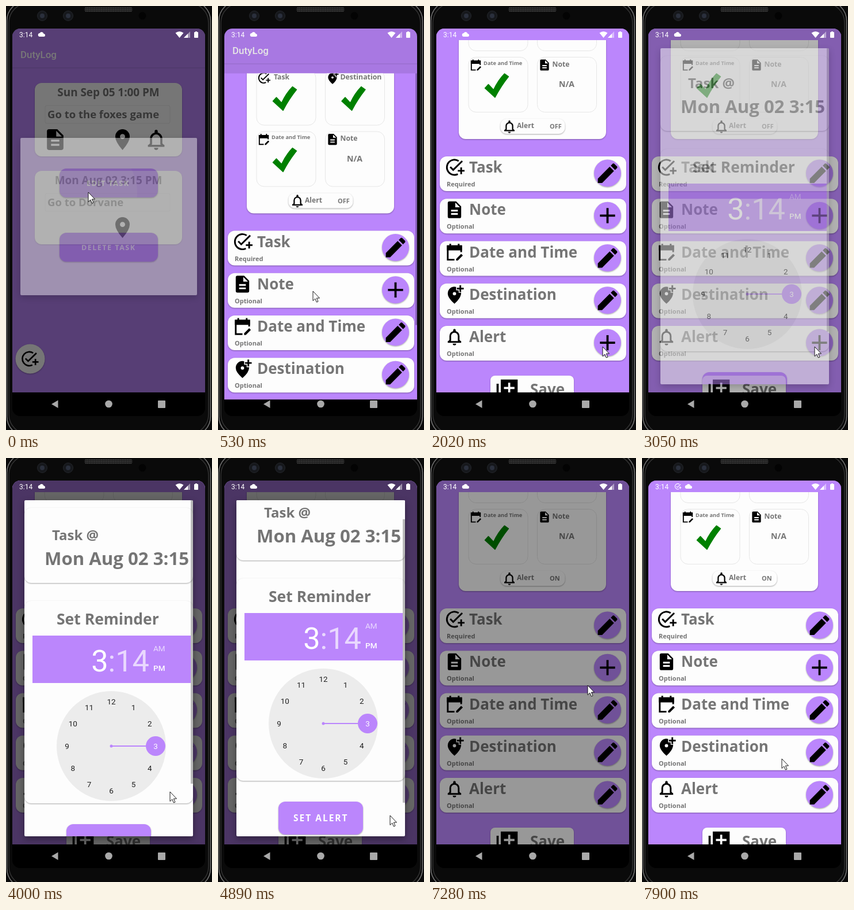
These frames come from a looping animation (358 px wide and 733 px high, 8000 ms). An HTML page:

```html
<!DOCTYPE html>
<html lang="en">
<head>
<meta charset="utf-8">
<title>Task reminder demo</title>
<style>
html, body { margin: 0; height: 100%; overflow: hidden; background: #0a0a0a; }
svg { display: block; width: 100vw; height: 100vh; }
text { font-family: "Open Sans", "Noto Sans", sans-serif; font-weight: 700; }
.ui { font-family: Roboto, sans-serif; font-weight: 400; }
.mid { text-anchor: middle; }
.end { text-anchor: end; }
.bold { font-weight: 500; }
.lift { filter: drop-shadow(0 1px 1px #0005); }
.high { filter: drop-shadow(0 4px 6px #0006); }
</style>
</head>
<body>
<svg id="stage" viewBox="0 0 358 733"></svg>
<script>
const PURPLE = '#bb86fc', PAPER = '#fdfdfd', GREY = '#757575';
const LOOP = 8000, TICKS = 63;

// Each icon: [filled path, stroked path] on a 24 unit grid.
const ICONS = {
  file: ['M14 2H6Q4 2 4 4V20Q4 22 6 22H18Q20 22 20 20V8ZM13 9V3.500L18.500 9ZM8 12V14H16V12ZM8 16V18H16V16Z', ''],
  pin: ['M12 22Q5 14 5 9A7 7 0 0 1 19 9Q19 14 12 22ZM9.500 9a2.500 2.500 0 0 0 5 0a2.500 2.500 0 0 0-5 0Z', ''],
  bell: ['M10 20H14A2 2 0 0 1 10 20ZM10.500 6V4A1.500 1.500 0 0 1 13.500 4V6Z', 'M4 18H20M5 18L7 16V11A5 5 0 0 1 17 11V16L19 18'],
  task: ['', 'M17 4.500A9 9 0 1 0 16 20M7 11.500L10.500 15L21.300 4.500M16 16H24M20 12V20'],
  date: ['M3 4H21V10H3ZM14 22V20L20 14L22 16L16 22Z', 'M12 21H4V5H20V12M7 2V5M17 2V5'],
  place: ['M12 23Q4 16 4 11A8 8 0 0 1 14 3V7H17V10H20Q20 16 12 23ZM10 11a2 2 0 0 0 4 0a2 2 0 0 0-4 0Z', 'M19 1V9M15 5H23'],
  edit: ['M3 17V21H7L18 10L14 6ZM15 5L19 9L21 7V6L18 3H17Z', ''],
  add: ['', 'M5 12H19M12 5V19'],
  save: ['M2 6V22H18V20H4V6ZM6 2V18H22V2ZM13 5H15V9H19V11H15V15H13V11H9V9H13Z', ''],
  cloud: ['M6 20A6 6 0 0 1 5 8A7.500 7.500 0 0 1 19 10A5 5 0 0 1 19 20Z', '']
};

const group = (id, body, more = '') => `<g id="${id}" ${more}>${body}</g>`;
const clipped = (id, body) => `<g clip-path="url(#${id})">${body}</g>`;
const icon = (name, x, y, size, color = '#000') =>
  `<g transform="translate(${x} ${y}) scale(${size / 24})"><path d="${ICONS[name][0]}" fill="${color}" fill-rule="evenodd"/>` +
  `<path d="${ICONS[name][1]}" fill="none" stroke="${color}" stroke-width="2"/></g>`;
const text = (x, y, size, str, fill = GREY, more = '') =>
  `<text x="${x}" y="${y}" font-size="${size}" fill="${fill}" ${more}>${str}</text>`;
const box = (x, y, w, h, r, fill, more = '') =>
  `<rect x="${x}" y="${y}" width="${w}" height="${h}" rx="${r}" fill="${fill}" ${more}/>`;
const dot = (x, y, r, fill, more = '') => `<circle cx="${x}" cy="${y}" r="${r}" fill="${fill}" ${more}/>`;
const card = (x, y, w, h, r = 12) => box(x, y, w, h, r, PAPER, 'class="lift"');
const button = (y, w, h, x, size, gap, str) =>
  box(178.500 - w / 2, y, w, h, 12, PURPLE, 'class="lift"') +
  text(x, y + h / 2 + size * .37, size, str, '#fff', `letter-spacing="${gap}"`);

const lens = x => dot(x, 17, 8.500, '#16181c', 'stroke="#24262b"') + dot(x, 17, 4, '#2a2f3c');
const rim = (inset, color) =>
  box(inset, inset - 10, 357 - 2 * inset, 755 - 2 * inset, 34, 'none', `stroke="${color}" stroke-width="1.500"`);

const phone = () => box(0, 0, 358, 733, 0, '#0a0a0a') + rim(1.500, '#777') + rim(5, '#333') +
  lens(63) + lens(108) + dot(237, 17, 6.500, '#030303') + box(136, 2, 84, 8, 3, '#1c1c1c') +
  '<path d="M138 3H218M138 6H218M138 9H218" stroke="#555" stroke-dasharray="2 1"/>' +
  box(11, 39, 335, 670, 14, '#000') +
  '<path d="M90.500 681.500V695L79 688.200Z" fill="#a9a9a9"/>' + dot(178.500, 688, 6.300, '#a9a9a9') +
  box(264, 682, 13, 13, 1, '#a9a9a9');

const status = () => text(23, 54, 12, '3:14', '#fff', 'class="ui"') +
  group('notice', icon('task', 56, 43, 12.500, '#fff')) + group('cloud', icon('cloud', 56, 43, 12, '#fff')) +
  '<path d="M301.500 55L294.500 46.500Q301.500 41.500 308.500 46.500ZM316 48V55H309Z" fill="#fff"/>' +
  '<path d="M320 44V55H309Z" fill="#fff" opacity=".45"/>' +
  box(327, 45, 7, 10, 1, '#fff') + box(329, 44, 3, 2, 0, '#fff');

const listCard = (y, date, what, icons) => card(50, y, 256, 127) +
  text(178, y + 23, 18.900, date, GREY, 'class="mid"') +
  box(68, y + 39, 217, 31, 3, PAPER, 'stroke="#0001"') + text(72, y + 61, 18.500, what) +
  icons.map((name, i) => name && icon(name, 64 + i * 58.500, y + 76.500, 43)).join('');

const listScreen = () => box(11, 20, 335, 648, 0, PURPLE) + box(11, 106, 335, 2, 0, '#0001') +
  text(25, 90, 17, 'DutyLog', '#fff', 'class="ui bold"') +
  listCard(133, 'Sun Sep 05 1:00 PM', 'Go to the foxes game', ['file', '', 'pin', 'bell']) +
  listCard(285, 'Mon Aug 02 3:15 PM', 'Go to Dorvane', ['', '', 'pin']) +
  dot(42, 610, 25.500, PAPER, 'class="lift"') + icon('task', 24.500, 594, 32);

const popup = () => box(25, 228, 307, 272, 2, '#fff', 'class="high"') +
  button(281, 171, 50, 140, 12.500, 1.500, 'EDIT TASK') +
  clipped('press', dot(143, 322, 85, '#fff', 'fill-opacity=".12"')) +
  button(392, 171, 50, 131, 12.500, 1.500, 'DELETE TASK');

const tick = (x, y) =>
  `<path transform="translate(${x} ${y})" d="M1 26L7 19.500L16 29Q24 12 35 1L42 6Q29 22 18.500 42Z" fill="green" stroke="green" stroke-width="1.500" stroke-linejoin="round"/>`;

const cell = ([name, title, size, indent], i) => {
  const x = 67 + i % 2 * 119.500, y = -17.500 + (i >> 1) * 106;
  return box(x, y, 103, 95, 13, PAPER, 'stroke="#e6e6e6"') + icon(name, x + 1, y + 2, 23) +
    text(x + indent, y + 4 + size, size, title) +
    (title === 'Note' ? text(x + 51, y + 51.500, 14.100, 'N/A', GREY, 'class="mid"') : tick(x + 27.500, y + 27.500));
};

const row = ([name, title, action], i) => {
  const y = 260 + i * 73.250;
  return card(17, y, 324, 60) + icon(name, 25, y + 1.500, 35) + text(68, y + 28, 26, title) +
    text(29, y + 52, 11, i ? 'Optional' : 'Required') + dot(308.500, y + 29, 23.500, PURPLE, 'class="lift"') +
    group('do' + title, icon(action, 286, y + 6.500, 45));
};

const editPage = () => card(50, -32, 256, 262) +
  [['task', 'Task', 12.200, 30], ['place', 'Destination', 12.300, 26],
    ['date', 'Date and Time', 9.300, 26], ['file', 'Note', 12.200, 26]].map(cell).join('') +
  card(122.500, 195, 112, 26, 11) + icon('bell', 124.500, 195, 27) + text(151, 211, 12.100, 'Alert') +
  text(208, 212, 11, 'OFF', GREY, 'id="state"') +
  [['task', 'Task', 'edit'], ['file', 'Note', 'add'], ['date', 'Date and Time', 'edit'],
    ['place', 'Destination', 'edit'], ['bell', 'Alert', 'add']].map(row).join('') +
  group('alertSet', icon('edit', 286, 559.500, 45)) +
  card(105, 639, 145, 60, 8) + icon('save', 112, 642, 44) + text(174, 671.500, 26, 'Save');

const clock = (cx, cy) => dot(cx, cy, 95, '#ececec') +
  `<path d="M${cx} ${cy}h62" stroke="${PURPLE}" stroke-width="2"/>` +
  dot(cx, cy, 2.500, PURPLE) + dot(cx + 77, cy, 17, PURPLE) +
  Array.from({ length: 12 }, (_, i) => {
    const hour = i + 1, a = hour * Math.PI / 6;
    return text(cx + 77 * Math.sin(a), cy - 77 * Math.cos(a) + 4.700, 13.500, hour,
      hour === 3 ? '#fff' : '#222', 'class="ui mid"');
  }).join('');

const form = () => card(32, 86, 293, 130) + text(80, 142, 24, 'Task @') + text(67, 185, 31.200, 'Mon Aug 02 3:15') +
  card(32, 247, 293, 350) + text(88, 288, 26.500, 'Set Reminder') + box(46, 307, 275, 82, 0, PURPLE) +
  text(249, 369, 52.300, '3<tspan fill-opacity=".68">:14</tspan>', '#fff', 'class="ui end"') +
  text(256, 334, 13.500, 'AM', '#ffffffb0', 'class="ui"') + text(256, 368, 13.500, 'PM', '#fff', 'class="ui bold"') +
  clock(183, 498) + button(633, 147, 57, 131, 15.500, 2, 'SET ALERT') +
  box(105, 633, 147, 57, 12, '#fff', 'id="ripple"');

const clip = (id, ...rect) => `<clipPath id="${id}">${box(...rect, '')}</clipPath>`;
const shade = id => box(11, 39, 335, 629, 0, '#000', `id="${id}"`);

const editScreen = () => clipped('win', box(11, 39, 335, 629, 0, PURPLE) +
  clipped('view', group('page', editPage())) + box(343, 59, 3, 480, 0, '#0004', 'id="pageBar"') + shade('dimEdit'));
const dialog = () => box(32, 73, 293, 581, 2, PAPER, 'class="high"') +
  clipped('pane', group('form', form()) + box(321, 73, 4, 490, 0, '#0004', 'id="formBar"'));

const el = id => document.getElementById(id);
el('stage').innerHTML = clip('screen', 11, 39, 335, 670, 14) + clip('win', 11, 39, 335, 629, 0) +
  clip('view', 11, 59, 335, 609, 0) + clip('pane', 32, 73, 293, 581, 2) + clip('press', 93, 281, 171, 50, 12) +
  '<clipPath id="reveal"><rect id="revealBox" x="11" width="335" height="670"/></clipPath>' +
  phone() + clipped('screen',
    clipped('win', group('list', listScreen()) + shade('dimList') + group('popup', popup())) +
    clipped('reveal', group('edit', editScreen())) + group('dialog', dialog()) + status()) +
  '<path id="cursor" d="M0 0V16.500L3.800 13L6.400 19L9 17.900L6.400 12H11.500Z" fill="#fff" stroke="#000" stroke-width=".900"/>';

const ramp = (n, from, to) => Math.min(1, Math.max(0, (n - from) / (to - from)));
const easeOut = (u, power) => 1 - (1 - u) ** power;
const move = (id, x, y) => el(id).setAttribute('transform', `translate(${x} ${y})`);
const fade = (id, value) => el(id).setAttribute('opacity', value);

// Pointer stops: [tick, x, y].
const STOPS = [[1, 143, 322], [4, 165, 493], [7, 186, 527], [10, 188, 446], [16, 300, 589], [26, 300, 589],
  [28, 288, 575], [31, 285, 577], [36, 298, 633], [40, 300, 603], [44, 217, 584], [48, 217, 584],
  [50, 284, 402], [53, 274, 393], [59, 274, 393], [62, 243, 520]];

function pointer(n) {
  let [, x, y] = STOPS[0];
  STOPS.slice(1).forEach(([end, px, py], i) => {
    const u = ramp(n, STOPS[i][0], end);
    x += (px - x) * u;
    y += (py - y) * u;
  });
  return [x, y];
}

// n counts screen refreshes.
function draw(n) {
  const open = ramp(n, 2, 7), slide = easeOut(open, 1.500);
  const scroll = 116 * easeOut(ramp(n, 8, 13), 1.950);
  const lift = 52 * easeOut(ramp(n, 36, 40), 2);
  const shown = ramp(n, 23, 25);

  fade('popup', .430 * (1 - ramp(n, 0, 2)));
  fade('dimList', .535 - .435 * ramp(n, 0, 2));
  move('list', 0, -13 * slide);

  el('revealBox').setAttribute('y', n < 2 ? 733 : 668 - 629 * easeOut(open, 4.100));
  move('edit', 0, 27 * (1 - slide));
  move('page', 0, 116 - scroll);
  move('pageBar', 0, scroll * .790);
  fade('pageBar', 1 - ramp(n, 12, 16));
  fade('dimEdit', .600 * (shown - ramp(n, 56, 59)));

  fade('dialog', shown - ramp(n, 48, 50));
  move('form', 0, -lift);
  move('formBar', 0, lift * .843);
  fade('formBar', 1 - ramp(n, 31, 36) + ramp(n, 36, 37) - ramp(n, 40, 44));
  fade('ripple', .240 * ramp(n, 46, 48));

  const alertOn = n >= 57, notified = n >= 60;
  el('state').textContent = alertOn ? 'ON' : 'OFF';
  fade('doAlert', +!alertOn);
  fade('alertSet', +alertOn);
  fade('notice', +notified);
  move('cloud', notified ? 19 : 0, 0);
  move('cursor', ...pointer(n));
}

function frame(now) {
  draw(Math.min(TICKS - 1, Math.floor((now % LOOP + 25) / LOOP * TICKS)));
  requestAnimationFrame(frame);
}
requestAnimationFrame(frame);
</script>
</body>
</html>
```
